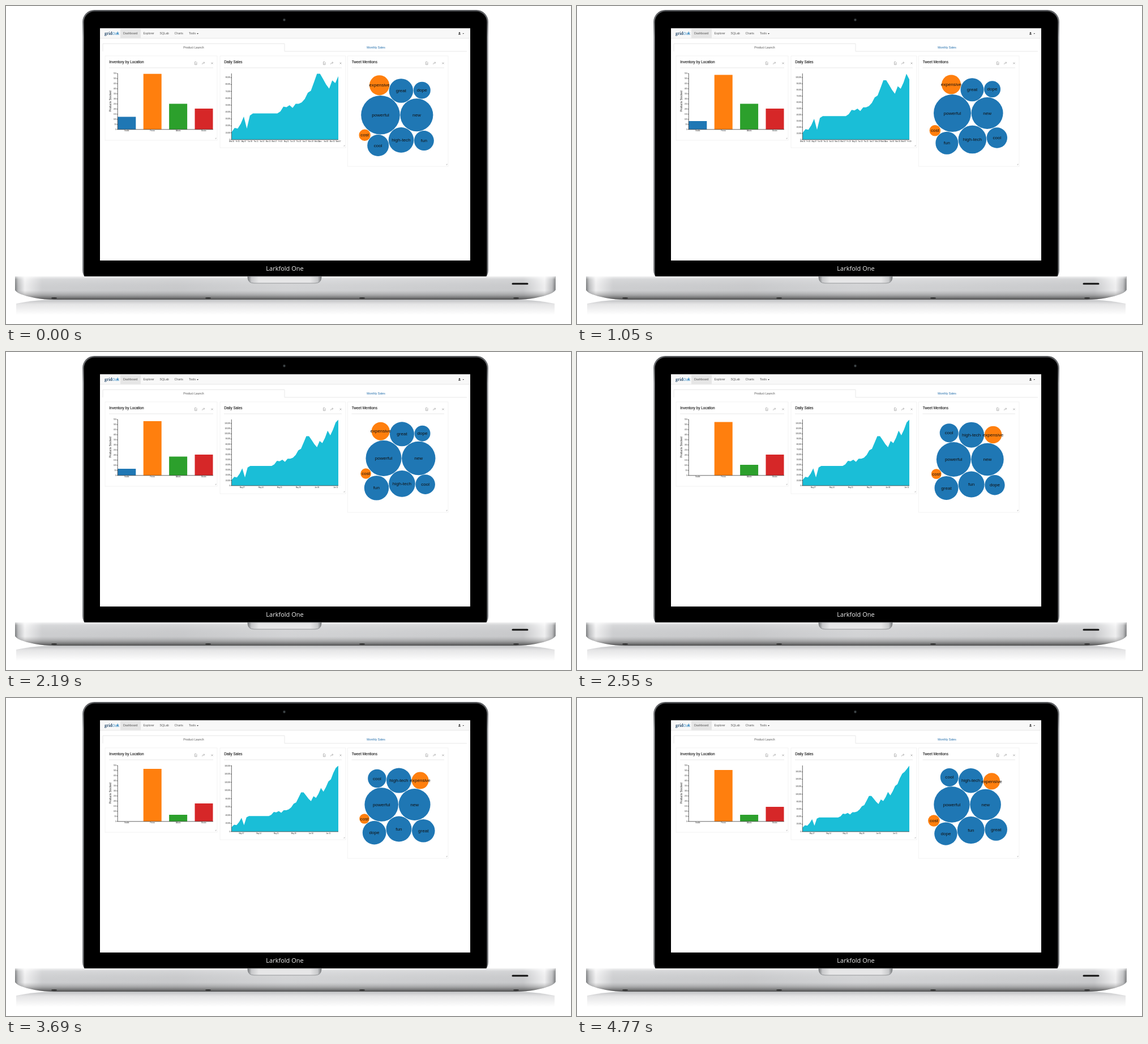
Write an HTML page that moves like this. It is 998 by 561 pixels and loops after 4.8 s.

```html
<!DOCTYPE html>
<html lang="en">
<head>
<meta charset="utf-8">
<title>Sales dashboard</title>
<style>
  html, body { margin: 0; width: 100%; height: 100%; overflow: hidden; background: #fff; }
  svg { display: block; width: 998px; height: 561px; font: 5.2px "Liberation Sans", Arial, sans-serif; fill: #555; }
  .mid { text-anchor: middle; }
  .end { text-anchor: end; }
  .title { font-size: 6.45px; fill: #111; stroke: #111; stroke-width: .1; }
  .tiny { font-size: 2.7px; fill: #222; }
  .word { font-size: 8.1px; fill: #111; }
  .rule { fill: none; stroke: #e2e2e2; stroke-width: .8; }
  .axis { fill: none; stroke: #222; stroke-width: .7; }
  .icon { fill: none; stroke: #aaa; stroke-width: .8; }
</style>
</head>
<body>
<svg viewBox="0 0 998 561">
  <defs>
    <linearGradient id="rim" x2="0" y2="1">
      <stop stop-color="#55575a"/><stop offset=".1" stop-color="#a6a8ab"/><stop offset="1" stop-color="#77797c"/>
    </linearGradient>
    <linearGradient id="metal">
      <stop stop-color="#77797b"/><stop offset=".006" stop-color="#bfc0c2"/><stop offset=".018" stop-color="#f4f4f5"/>
      <stop offset=".05" stop-color="#d0d1d3"/><stop offset=".3" stop-color="#cbccce"/><stop offset=".5" stop-color="#d6d7d9"/>
      <stop offset=".94" stop-color="#cbccce"/><stop offset=".98" stop-color="#f4f4f5"/>
      <stop offset=".994" stop-color="#bfc0c2"/><stop offset="1" stop-color="#77797b"/>
    </linearGradient>
    <linearGradient id="shade" x2="0" y2="1">
      <stop stop-color="#fff" stop-opacity=".7"/><stop offset=".12" stop-color="#fff" stop-opacity=".15"/>
      <stop offset=".6" stop-color="#888" stop-opacity=".05"/><stop offset=".8" stop-color="#555" stop-opacity=".35"/>
      <stop offset="1" stop-color="#222" stop-opacity=".75"/>
    </linearGradient>
    <linearGradient id="notch">
      <stop stop-color="#77797b"/><stop offset=".05" stop-color="#c8c9cb"/><stop offset=".15" stop-color="#e6e6e7"/>
      <stop offset=".85" stop-color="#e6e6e7"/><stop offset=".95" stop-color="#c8c9cb"/><stop offset="1" stop-color="#77797b"/>
    </linearGradient>
    <linearGradient id="mirror" x2="0" y2="1">
      <stop stop-color="#bfc0c2"/><stop offset=".3" stop-color="#e5e5e6"/><stop offset="1" stop-color="#fff"/>
    </linearGradient>
  </defs>

  <path d="M18 525Q45 519 85 518H901Q941 519 969 525V545H18Z" fill="url(#mirror)"/>
  <rect x="135" y="7" width="717" height="480" rx="21" fill="url(#rim)"/>
  <rect x="137.5" y="9.5" width="712" height="480" rx="19" fill="#000"/>
  <circle cx="491.5" cy="24.5" r="2.4" fill="#2b2d30"/><circle cx="491.5" cy="24.5" r="1" fill="#566"/>
  <rect x="166" y="39.5" width="654" height="409.5" fill="#fff"/>
  <text x="492.5" y="467" class="mid" style="font: 11px 'Open Sans', sans-serif" fill="#f2f2f2">Larkfold One</text>
  <g id="base">
    <path id="body" d="M16 477H970.5V501Q966 509 935 515Q920 518 900 518H86Q66 518 51 515Q20 509 16 501Z" fill="url(#metal)"/>
    <use href="#body" style="fill: url(#shade)"/>
    <path d="M16 477H970.5V501Q966 509 935 515Q920 518 900 518H86Q66 518 51 515Q20 509 16 501Z" fill="url(#shade)"/>
    <path d="M427 477H557V480Q556 489 546 489H438Q428 489 427 480Z" fill="url(#notch)" stroke="#85878a" stroke-width=".8"/>
    <path d="M895 490H921" stroke="#111" stroke-width="3" stroke-linecap="round"/>
  </g>

  <rect x="166" y="39.5" width="654" height="17.5" fill="#f8f8f8"/>
  <path class="rule" d="M166 57H820"/>
  <rect x="202" y="40.5" width="36" height="16.3" fill="#e6e6e6"/>
  <text x="174" y="50.5" style="font: bold 6.6px 'Noto Serif', serif" fill="#24486b" textLength="none">grid<tspan fill="#2f86c2" font-weight="normal">Oak</tspan></text>
  <circle cx="197" cy="48" r="1.2" fill="#2f86c2"/>
  <g id="menu"></g>
  <path d="M337 48h3l-1.5 1.7zM806.500 48h2.600l-1.300 1.500z" fill="#333"/>
  <path d="M799 50.500q0-2 2-2t2 2z" fill="#444"/><circle cx="801" cy="47.300" r="1.200" fill="#444"/>
  <path class="rule" d="M171 80V66.500H492V80H814"/>
  <text x="331.500" y="75" class="mid">Product Launch</text>
  <text x="653.500" y="75" class="mid" fill="#1c69a8">Monthly Sales</text>
  <g id="panels"></g>
  <g id="charts"></g>
</svg>
<script>
const LOOP = 4800;
const byId = id => document.getElementById(id);
const mix = (a, b, p) => a + (b - a) * p;
const ease = p => p * p * (3 - 2 * p);
const range = n => [...Array(n).keys()];
const label = (x, y, text, cls = '') => `<text x="${x}" y="${y}" class="${cls}">${text}</text>`;
const line = (d, cls) => `<path d="${d}" class="${cls}"/>`;

// Pose at time t: each state is eased into from its start time.
function pose(states, starts, duration, t) {
  const k = starts.findLastIndex(s => t >= s);
  const p = ease(Math.min(1, (t - starts[k]) / duration));
  return states[k].map((v, i) => mix(states[Math.max(0, k - 1)][i], v, p));
}

// Static dashboard furniture
byId('menu').innerHTML = [['Dashboard', 207], ['Explorer', 242.5], ['SQLab', 271.5], ['Charts', 297.5], ['Tools', 323]]
  .map(([text, x]) => label(x, 50.3, text)).join('');
byId('panels').innerHTML = [
  ['Inventory by Location', 175, 373, 237], ['Daily Sales', 378, 600, 250], ['Tweet Mentions', 603.5, 781, 283]
].map(([text, left, right, bottom]) => {
  const x = right - 39.5, handle = bottom - 4;
  return `<rect x="${left}" y="88" width="${right - left}" height="${bottom - 88}" class="rule" style="stroke:#f0f0f0"/>`
    + label(left + 7.3, 101.2, text, 'title')
    + line(`M${left + 7} 109H${right - 7}`, 'rule')
    + line(`M${x} 98.500h2.500l1 1v4h-3.500zM${x + 1} 101.500h1.700`, 'icon')
    + line(`M${x + 13} 103q0-3 3.500-3m-1-1.500l2 1.500l-2 1.500`, 'icon')
    + line(`M${x + 29} 99.500l3 3m0-3l-3 3`, 'icon')
    + line(`M${right - 2} ${handle - .5}v1.500h-1.500`, 'icon');
}).join('');
byId('base').insertAdjacentHTML('beforeend', [85, 357, 629, 901]
  .map(x => `<ellipse cx="${x}" cy="515.3" rx="5" ry="1.3" fill="#333"/>`).join(''));

// Bar chart: top edge of each bar
const barTops = [
  [195.5, 119.7, 172.5, 181], [203, 121.5, 172.5, 181], [206, 122, 184.5, 181],
  [217.8, 123.5, 199, 181], [217.8, 123.5, 199, 184], [217.8, 125, 206, 186], [217.8, 127, 206, 192]
];
const barStarts = [-1e4, 690, 1690, 2300, 2900, 3500, 4200];
const barColors = ['#1f77b4', '#ff7f0e', '#2ca02c', '#d62728'];
const cities = ['Seattle', 'Fresno', 'Atlanta', 'Boston'];

function bars(t) {
  const ticks = range(12).map(i => {
    const y = 217.8 - i * 8.98;
    return label(194.5, y + .9, i * 50, 'tiny end') + line(`M195.5 ${y}h1.700`, 'axis');
  }).join('');
  return ticks + pose(barTops, barStarts, 100, t).map((top, i) => {
    const x = 197.3 + i * 45.4;
    return `<rect x="${x}" y="${top}" width="32" height="${217.8 - top}" fill="${barColors[i]}"/>`
      + label(x + 16, 221.3, cities[i], 'tiny mid');
  }).join('')
    + line('M197.200 119V217.800H366', 'axis')
    + `<text transform="translate(186 168) rotate(-90)" class="mid" style="font-size:4.75px" fill="#222">Products Stocked</text>`;
}

// Area chart: daily sales in thousands, one more day per update
const sales = [11, 17, 16, 23, 33.5, 16, 35, ...Array(9).fill(38), 41, 48, 47, 50, 46, 52, 52, 54, 59, 68, 71, 83,
  95.5, 95.5, 88, 80, 74, 86, 82, 92, 106, 97, 108, 122, 127, 143, 155, 160, 168, 176];
const PERIOD = 480, FIRST_DAYS = 35;
const peak = last => Math.max(...sales.slice(0, last + 1));

function dayName(i) {
  const date = new Date(Date.UTC(2017, 4, 3 + i));
  const show = options => date.toLocaleDateString('en-US', { timeZone: 'UTC', ...options });
  const day = date.getUTCDate();
  if (day === 1) return show({ month: 'long' });
  return show(date.getUTCDay() ? { weekday: 'short' } : { month: 'short' }) + ' ' + String(day).padStart(2, '0');
}

function area(t) {
  const clock = t / PERIOD + .65, count = Math.floor(clock);
  const last = FIRST_DAYS + count, before = count ? last - 1 : last;
  const p = ease(Math.min(1, (clock - count) * PERIOD / 100));
  const days = mix(before, last, p), top = mix(peak(before), peak(last), p);
  const px = i => 398.5 + 188.5 * Math.min(1, i / days);
  const py = v => 235.8 - 116.2 * v / top;
  const edge = range(last + 1).map(i => `L${px(i)} ${py(sales[i] * (i > before ? p : 1))}`).join('');
  const step = peak(last) > 140 ? 20 : 10;
  const yTicks = range(Math.floor(top / step) + 1).map(i =>
    label(396, py(i * step) + .9, (i * step * 1000).toLocaleString('en-US'), 'tiny end')
    + line(`M396.800 ${py(i * step)}h1.500`, 'axis')).join('');
  // Every other day (restarting each month) while short, then Sundays
  const shown = range(last + 1).filter(i => last > 37 ? i % 7 === 4 : i < 29 ? i % 2 === 0 : i % 2);
  return `<path d="M398.500 235.800${edge}V235.800Z" fill="#1abed7"/>`
    + line('M398.300 119V235.800H587', 'axis') + yTicks
    + shown.map(i => label(px(i), 239.7, dayName(i), 'tiny mid')).join('');
}

// Bubble chart: circles packed around the two biggest words
const words = ['powerful', 'new', 'expensive', 'great', 'dope', 'cool', 'high-tech', 'fun', 'cost'];

// Circle of radius r touching a and b, to the left of a -> b
function touching(a, b, r) {
  const gap = .6, dx = b.x - a.x, dy = b.y - a.y, d = Math.hypot(dx, dy);
  const ra = a.r + r + gap, rb = b.r + r + gap;
  const along = (ra * ra - rb * rb + d * d) / (2 * d), across = Math.sqrt(ra * ra - along * along);
  return { x: a.x + (dx * along + dy * across) / d, y: a.y + (dy * along - dx * across) / d, r };
}

function pack(order, x, y, ra, rb, topLeft, topMid, topRight, lowLeft, lowMid, lowRight, small) {
  const a = { x, y, r: ra }, b = { x: x + ra + rb + .6, y, r: rb };
  const up = touching(a, b, topMid), down = touching(b, a, lowMid), left = touching(down, a, lowLeft);
  const circles = [a, b, touching(a, up, topLeft), up, touching(up, b, topRight),
    left, down, touching(b, down, lowRight), touching(left, a, small)];
  const names = ['powerful', 'new', ...order.split(' '), 'cost'];
  return words.flatMap(w => { const c = circles[names.indexOf(w)]; return [c.x, c.y, c.r]; });
}

const packs = [
  pack('expensive great dope cool high-tech fun', 661.5, 192.3, 34.3, 29, 17.6, 21.3, 15, 19, 22.3, 17.5, 10.2),
  pack('expensive great dope fun high-tech cool', 663, 189, 33, 28, 17, 20.5, 14.5, 20, 24.8, 18.2, 9.8),
  pack('expensive great dope fun high-tech cool', 667, 187.5, 31.5, 29.7, 16, 21.5, 14, 21.7, 23.3, 17.3, 9.3),
  pack('cool high-tech expensive great fun dope', 665.3, 189.5, 30.4, 28.7, 16.5, 22.5, 15.3, 21, 23, 17.7, 8.9),
  pack('cool high-tech expensive dope fun great', 663.2, 188, 29.8, 28, 16.2, 22, 15, 20.8, 22.5, 20.3, 8.8),
  pack('cool high-tech expensive dope fun great', 662, 188, 31.7, 27.3, 16, 21.7, 14.6, 20.2, 24, 19.8, 10.3)
];
const packStarts = [-1e4, 540, 1500, 2200, 3270, 4250];

function bubbles(t) {
  const v = pose(packs, packStarts, 240, t);
  const circles = words.map((w, i) => `<circle cx="${v[3 * i]}" cy="${v[3 * i + 1]}" r="${v[3 * i + 2]}"
    fill="${w === 'expensive' || w === 'cost' ? '#ff7f0e' : '#1f77b4'}"/>`);
  return circles.join('') + words.map((w, i) => label(v[3 * i], v[3 * i + 1] + 2.6, w, 'word mid')).join('');
}

function draw() {
  const t = performance.now() % LOOP;
  byId('charts').innerHTML = bars(t) + area(t) + bubbles(t);
  requestAnimationFrame(draw);
}
draw();
</script>
</body>
</html>
```
